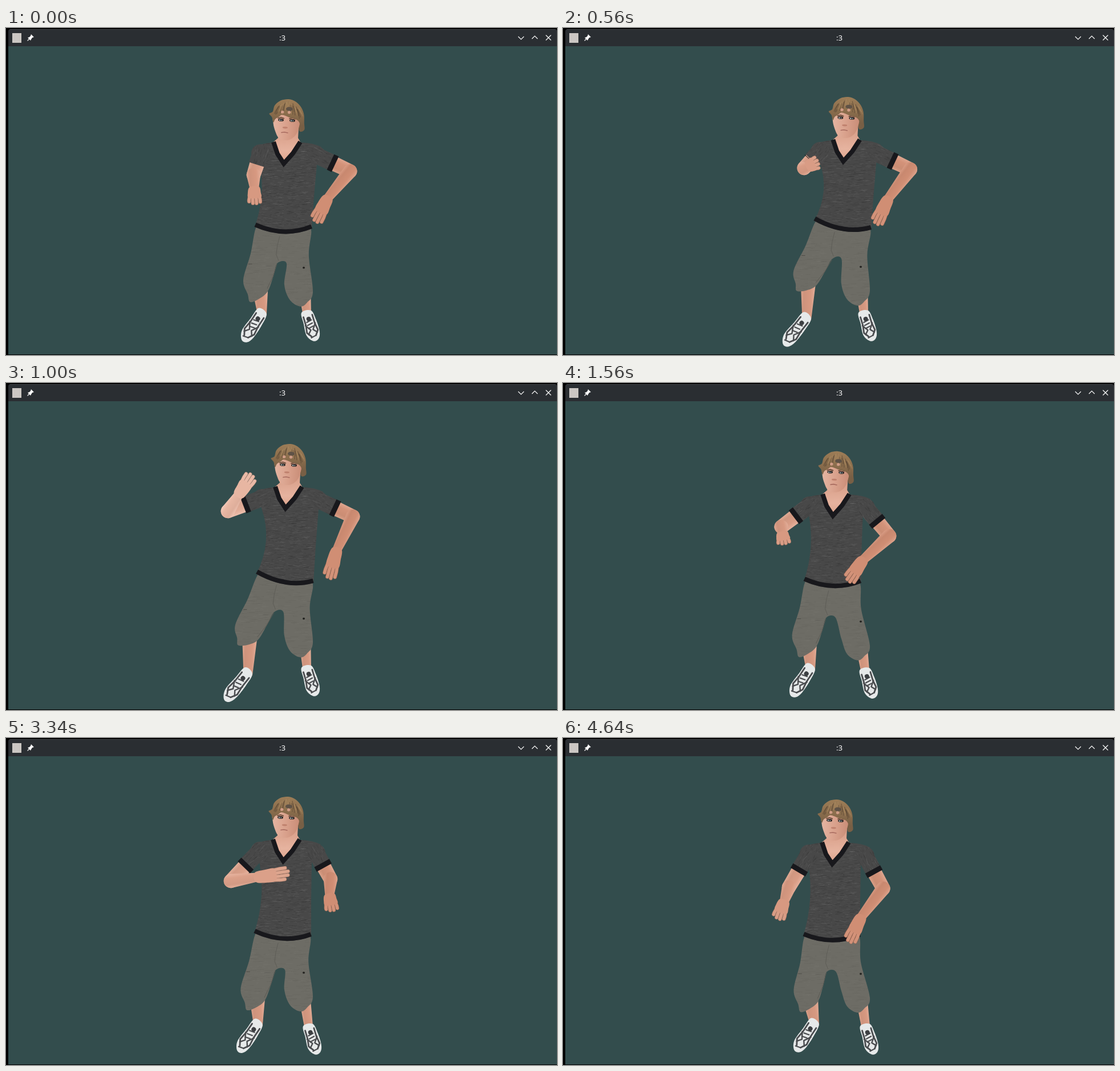
An HTML page with a canvas for the animation above (8000 ms loop, 966x574 px).

```html
<!DOCTYPE html>
<html lang="en">
<head>
<meta charset="utf-8">
<title>:3</title>
<style>
  html, body { margin: 0; width: 100%; height: 100%; overflow: hidden; background: #000; }
  canvas { display: block; }
</style>
</head>
<body>
<canvas id="stage" width="966" height="574"></canvas>
<script>
const ctx = document.getElementById('stage').getContext('2d');
const LOOP = 8000;
const BAND = '#18181c';

// Key poses: neckline tip, left toe x, left elbow from its shoulder,
// and both fingertips from their elbows. Every other joint follows by rule.
const poses = [
  { vee: [487, 247], toe: [418], elbow: [-12, 38], left: [3, 53], right: [-61, 91] },
  { vee: [490, 250], toe: [402], elbow: [-10, 29], left: [-18, 32], right: [-64, 90] },
  { vee: [493, 235], toe: [377], elbow: [-48, 31], left: [53, -52], right: [-56, 108] },
  { vee: [490, 229], toe: [387], elbow: [-60, 23], left: [43, -66], right: [-42, 111] },
  { vee: [466, 236], toe: [410], elbow: [-45, 44], left: [-12, 63], right: [-86, 69] },
  { vee: [486, 225], toe: [410], elbow: [-51, 53], left: [104, -15], right: [4, 58] },
  { vee: [472, 230], toe: [410], elbow: [-35, 59], left: [-19, 58], right: [-60, 96] }
];

// Time, pose phase, vertical shift of the upper body.
const knots = [
  [0, 0, 0], [160, .9, 0], [400, 1, 0], [720, 2, 0], [1000, 3, 0], [1240, 3.15, 0],
  [1560, 3.7, 8], [1700, 3.87, 6], [1960, 4, 0], [3340, 5, 0], [3920, 5.4, -8], [4640, 6, 0]
];
// The picture is redrawn only at these moments.
const steps = (from, to, n) => Array.from({ length: n + 1 }, (_, i) => from + (to - from) * i / n);
const ticks = [0, 20, 90, 160, 400, ...steps(420, 720, 7), ...steps(820, 1000, 5),
  ...steps(1100, 1140, 2), 1240, 1560, 1700, 1960, 3340, 3920, 4640];

const mix = (a, b, k) => a + (b - a) * k;
const clamp = (v, lo, hi) => Math.max(lo, Math.min(hi, v));
const off = (p, x, y) => [p[0] + x, p[1] + y];
const between = (a, b, k) => [mix(a[0], b[0], k), mix(a[1], b[1], k)];
const dist = (a, b) => Math.hypot(b[0] - a[0], b[1] - a[1]);

function stateAt(t) {
  const now = ticks.filter(s => s <= t).pop();
  let i = 0;
  while (i < knots.length - 2 && knots[i + 1][0] <= now) i++;
  const a = knots[i], b = knots[i + 1];
  const k = clamp((now - a[0]) / (b[0] - a[0]), 0, 1);
  return { phase: mix(a[1], b[1], k), lift: mix(a[2], b[2], k) };
}

function poseAt({ phase, lift }) {
  const i = Math.min(poses.length - 2, Math.floor(phase));
  const key = name => poses[i][name].map((v, n) => mix(v, poses[i + 1][name][n], phase - i));
  const vee = off(key('vee'), 0, lift), [toeX] = key('toe');
  const turn = clamp(phase - 3, 0, 1);

  // Trunk and legs lean with the stride of the left foot.
  const stride = vee[0] - 1 - toeX, raise = Math.max(0, stride - 70);
  const hip = [vee[0] - 1, 300 + vee[1] * .2 - (stride - 80) * .12];
  const slope = (60 - stride) * .19;
  const hemL = off(hip, -50, slope), hemR = off(hip, 50, -slope);
  const toeL = [toeX, 546 + raise * .25], toeR = [541 + 3 * turn, 545 + 6 * turn];
  const kneeL = [(hemL[0] + toeX) / 2 - 11, 442 - raise * .55];

  // Arms hang from the shoulders.
  const shoulderL = off(vee, -41, -27), shoulderR = off(vee, 58, -23);
  const elbowL = off(shoulderL, ...key('elbow'));
  const tipL = off(elbowL, ...key('left'));
  const right = key('right'), angle = mix(.44, 1.07, turn);
  const upper = 38 + .24 * Math.hypot(...right);
  const elbowR = off(shoulderR, Math.cos(angle) * upper, Math.sin(angle) * upper);
  const tipR = off(elbowR, ...right);

  return {
    vee, turn, raise, hemL, hemR, toeL, toeR, kneeL,
    head: off(vee, 7, -122),
    crotch: off(hip, -.25 * (stride - 55), 61 - raise * .1),
    cuffA: off(kneeL, 12 - raise * .22, 39 - raise * .1),
    cuffB: off(kneeL, 43 - raise * .1, 20 + raise * .2),
    shinR: [516, 484 + (vee[1] - 235) * .4],
    ankleL: off(toeL, 31 + raise * .2, -47),
    armL: { shoulder: shoulderL, elbow: elbowL, wrist: between(elbowL, tipL, .43), tip: tipL, light: .25 },
    armR: { shoulder: shoulderR, elbow: elbowR, wrist: off(between(elbowR, tipR, .57), -4, -5), tip: tipR, light: 0 }
  };
}

function random(seed) {
  return () => (seed = (seed * 16807) % 2147483647) / 2147483647;
}

function cloth(base, dark, light, count, reach, seed) {
  const tile = document.createElement('canvas');
  tile.width = tile.height = 160;
  const g = tile.getContext('2d'), rnd = random(seed);
  g.fillStyle = base;
  g.fillRect(0, 0, 160, 160);
  for (let i = 0; i < count; i++) {
    g.fillStyle = rnd() < .5 ? dark : light;
    g.fillRect(rnd() * 160, Math.floor(rnd() * 160), 2 + rnd() * reach, 1);
  }
  return ctx.createPattern(tile, 'repeat');
}
const knit = cloth('#484848', 'rgba(0,0,0,.1)', 'rgba(255,255,255,.045)', 1500, 8, 7);
const twill = cloth('#6d6c65', 'rgba(0,0,0,.035)', 'rgba(255,255,255,.02)', 600, 14, 21);

// Closed smooth curve through the given points.
function blob(pts, fill) {
  const n = pts.length, at = i => pts[(i + n) % n];
  ctx.beginPath();
  ctx.moveTo(...pts[0]);
  for (let i = 0; i < n; i++) {
    const a = at(i - 1), b = at(i), c = at(i + 1), d = at(i + 2);
    ctx.bezierCurveTo(b[0] + (c[0] - a[0]) / 6, b[1] + (c[1] - a[1]) / 6,
      c[0] - (d[0] - b[0]) / 6, c[1] - (d[1] - b[1]) / 6, ...c);
  }
  ctx.fillStyle = fill;
  ctx.fill();
}

function poly(pts, fill) {
  ctx.beginPath();
  pts.forEach(p => ctx.lineTo(...p));
  ctx.fillStyle = fill;
  ctx.fill();
}

function line(pts, color, width, join = 'round') {
  ctx.beginPath();
  pts.forEach(p => ctx.lineTo(...p));
  ctx.strokeStyle = color;
  ctx.lineWidth = width;
  ctx.lineJoin = join;
  ctx.lineCap = join === 'round' ? 'round' : 'butt';
  ctx.stroke();
}

function oval(x, y, rx, ry, fill) {
  ctx.beginPath();
  ctx.ellipse(x, y, rx, ry, 0, 0, 7);
  ctx.fillStyle = fill;
  ctx.fill();
}

// Run a drawing with the x axis pointing from a to b.
function along(a, b, paint) {
  ctx.save();
  ctx.translate(...a);
  ctx.rotate(Math.atan2(b[1] - a[1], b[0] - a[0]));
  paint(dist(a, b));
  ctx.restore();
}

const tone = (k, shade = 1) =>
  `rgb(${[mix(208, 234, k), mix(142, 186, k), mix(116, 167, k)].map(v => Math.round(v * shade))})`;

function limb(a, b, ra, rb, k) {
  along(a, b, len => {
    const g = ctx.createLinearGradient(0, -ra, 0, ra);
    g.addColorStop(0, tone(k + .45));
    g.addColorStop(.3, tone(k));
    g.addColorStop(.75, tone(k, .96));
    g.addColorStop(1, tone(k + .3));
    ctx.beginPath();
    ctx.arc(0, 0, ra, Math.PI / 2, Math.PI * 1.5);
    ctx.arc(len, 0, rb, -Math.PI / 2, Math.PI / 2);
    ctx.fillStyle = g;
    ctx.fill();
  });
}

function hand(wrist, tip, k) {
  along(wrist, tip, d => {
    const len = Math.max(d, 22);
    for (let i = 0; i < 4; i++) {
      const y = -9 + i * 6.5, reach = len * (1 - .045 * (i - 1.3) ** 2) - 3;
      const pts = [[len * .4, y * .8], [len * .7, y], [reach, y]];
      line(pts, tone(k, .78), 6.6);
      line(pts, tone(k + .1), 5.2);
    }
    blob([[-2, -8], [len * .3, -11], [len * .55, -11], [len * .6, 0], [len * .55, 11],
      [len * .3, 12], [-2, 8]], tone(k));
  });
}

function sleeve(from, to, band) {
  along(from, to, len => {
    oval(0, 0, 16, 16, knit);
    ctx.fillRect(0, -14.5, len, 29);
    ctx.fillStyle = BAND;
    ctx.fillRect(len + 2 - band, -15, band, 30);
  });
}

function shoe(ankle, toe) {
  along(ankle, toe, len => {
    const x = k => len * k, dark = '#4a4c4f';
    blob([[-2, -8], [x(.35), -12], [x(.8), -12], [len + 2, -7], [len + 4, 3], [x(.82), 12],
      [x(.35), 11], [-3, 9]], '#e6e9e9');
    for (const side of [-1, 1]) {
      line([[x(.12), side * 8], [x(.45), side * 8], [x(.72), side * 10], [x(.9), side * 4]], dark, 2.8);
      line([[x(.45), side * 9], [x(.66), side * 2], [x(.8), side * 8]], dark, 2.4);
    }
    for (const k of [.3, .42, .54, .9]) line([[x(k), -4], [x(k + .04), 5]], dark, 2.2);
    oval(x(.24), 0, 4, 4, '#3c3f42');
  });
}

function drawLegs(p) {
  const c = p.crotch, s = p.shinR, outer = off(s, 22, -26);
  const ankleR = off(p.toeR, -13.5, -45);
  limb(off(between(p.cuffA, p.cuffB, .58), 0, -6), off(p.ankleL, 0, 3), 13, 8, .25);
  limb(off(s, 9, -14), ankleR, 9.5, 7.5, .25);
  shoe(p.ankleL, p.toeL);
  shoe(ankleR, p.toeR);

  twill.setTransform(new DOMMatrix().translate(...c));
  blob([
    off(p.hemL, 16, -6), off(p.hemL, 2, 2), off(between(p.hemL, p.kneeL, .5), 3, 0), p.kneeL,
    between(p.kneeL, p.cuffA, .65), p.cuffA, off(between(p.cuffA, p.cuffB, .5), 0, 4), p.cuffB,
    off(between(p.cuffB, c, .55), -3, 0), off(c, -7, 1), off(c, 9, 1),
    off(s, -28, -38), off(s, -18, -11), s, off(s, 12, -7), outer,
    off(between(p.hemR, outer, .42), -6, 0), off(p.hemR, -1, 2), off(p.hemR, -16, -6)
  ], twill);

  // Seams, fly and pocket marks
  line([off(c, -3, -46), off(c, -7, -30), off(c, -9, -14), off(c, -5, -4)], '#5e5d57', 1);
  line([off(p.cuffB, -1, -5), off(between(p.cuffB, c, .5), -3, 0), off(c, -8, 3)], '#5b5a54', 1);
  oval(s[0] + 6, s[1] - 68, 2, 1.8, '#22221f');
  const pocket = between(p.hemL, p.kneeL, .7);
  line([off(pocket, 3, 0), off(pocket, 9, 0)], '#4d4c47', 1);
}

function drawTorso(p) {
  const v = p.vee, mid = between(p.hemL, p.hemR, .5);
  const pitL = off(v, -42, -9), pitR = off(v, 58 - 8 * p.turn, -8);
  knit.setTransform(new DOMMatrix().translate(...v));
  ctx.beginPath();
  ctx.moveTo(...off(v, -20, -46));
  ctx.quadraticCurveTo(...off(v, -36, -45), ...off(v, -46, -40));
  ctx.lineTo(...pitL);
  ctx.quadraticCurveTo(...off(between(pitL, p.hemL, .5), 15 + p.raise * .3, 0), ...p.hemL);
  ctx.quadraticCurveTo(...off(mid, 2, 21), ...p.hemR);
  ctx.quadraticCurveTo(...off(between(pitR, p.hemR, .5), -1, 0), ...pitR);
  ctx.lineTo(...off(v, 66, -38));
  ctx.quadraticCurveTo(...off(v, 52, -45), ...off(v, 33, -46));
  ctx.fillStyle = knit;
  ctx.fill();

  ctx.beginPath();
  ctx.moveTo(...off(p.hemL, 1, -4));
  ctx.quadraticCurveTo(...off(mid, 2, 17), ...off(p.hemR, -.5, -4));
  ctx.strokeStyle = BAND;
  ctx.lineWidth = 8;
  ctx.lineCap = 'butt';
  ctx.stroke();
}

function drawNeck(p) {
  const v = p.vee, h = p.head;
  const g = ctx.createLinearGradient(0, h[1] + 60, 0, v[1]);
  g.addColorStop(0, '#d9a08a');
  g.addColorStop(.5, '#e6b39f');
  g.addColorStop(1, '#d99c82');
  const left = off(v, -18, -47), tip = off(v, 0, -9), right = off(v, 29, -47);
  poly([off(h, -18, 52), off(h, -17, 68), left, tip, right, off(h, 18, 68), off(h, 19, 52)], g);
  line([left, off(v, -11, -26), tip, off(v, 16, -27), right], BAND, 8, 'miter');
}

function drawHead(p) {
  ctx.save();
  ctx.translate(...off(p.head, 0, 36));
  ctx.rotate(.05);
  ctx.translate(0, -36);
  const face = ctx.createLinearGradient(-25, 0, 22, 0);
  face.addColorStop(0, '#e4b4a1');
  face.addColorStop(.5, '#d9a18c');
  face.addColorStop(1, '#c98d77');
  blob([[-25, 30], [-25, 44], [-21, 57], [-15, 68], [-6, 72], [4, 71], [13, 65], [19, 54],
    [22, 40], [20, 26], [-8, 20]], face);

  for (const x of [-12, 8]) {
    line([[x - 5, 34], [x, 32.5], [x + 5, 34]], '#6b4d3c', 2);
    oval(x, 37, 5, 2.4, '#2b2422');
    oval(x - .5, 37.4, 3, 1.2, '#c4cac9');
    oval(x, 37.2, 1.4, 1.4, '#354044');
  }
  oval(-4, 50, 4.5, 1.6, 'rgba(165,95,78,.5)');
  line([[-10, 59], [-5, 58], [1, 59]], '#a86c60', 1.6);

  const hair = ctx.createLinearGradient(0, 0, 0, 45);
  hair.addColorStop(0, '#9d7d57');
  hair.addColorStop(.5, '#8d6f4d');
  hair.addColorStop(1, '#785f45');
  blob([[-33, 27], [-27, 23], [-24, 12], [-14, 3], [0, 0], [13, 4], [23, 14], [28, 26], [29, 40],
    [30, 52], [23, 56], [20, 51], [21, 41], [15, 35], [3, 32], [-10, 28], [-16, 32], [-22, 36],
    [-25, 42], [-28, 33]], hair);
  const rnd = random(11);
  for (let i = 0; i < 26; i++) {
    const x = -22 + i * 1.85, top = 4 + x * x * .02 + rnd() * 6;
    line([[x * .8, top], [x, top + 8], [x * 1.08, top + 10 + rnd() * 6]],
      rnd() < .5 ? 'rgba(62,50,40,.4)' : 'rgba(180,148,106,.4)', 1.3);
  }
  oval(2, 17, 6, 3.5, '#5f5246');
  for (const x of [-10, 2]) oval(x, 23, 2.8, 2.6, '#cf9c86');
  ctx.restore();
}

function drawArm({ shoulder, elbow, wrist, tip, light }) {
  const cuff = between(shoulder, elbow, .52);
  const raised = clamp((elbow[1] - wrist[1]) / 25, 0, 1);
  const k = mix(light, .9, raised);
  const fore = () => {
    limb(elbow, wrist, 12.3, 8, k);
    hand(wrist, tip, k);
  };
  limb(cuff, elbow, 13, 12.3, mix(light, .6, raised) + .1);
  if (!raised) fore();
  sleeve(shoulder, cuff, clamp(dist(shoulder, elbow) - 40, 0, 9));
  if (raised) fore();
}

function drawWindow() {
  ctx.fillStyle = '#000';
  ctx.fillRect(0, 0, 966, 574);
  ctx.fillStyle = '#334d4d';
  ctx.fillRect(4, 31, 962, 542);
  ctx.fillStyle = '#2a2e32';
  ctx.beginPath();
  ctx.roundRect(4, 2, 962, 30, [4, 4, 0, 0]);
  ctx.fill();
  line([[7, 2.5], [963, 2.5]], '#44484c', 1);
  ctx.fillStyle = '#cbc7c3';
  ctx.fillRect(11, 9, 16, 17);

  const ink = '#fcfcfc';
  poly([[44, 11], [49, 16], [46, 17], [44, 20], [43, 22], [38, 17], [41, 16], [43, 14]], ink);
  line([[41, 19], [38, 22]], ink, 1.2);
  line([[898, 15], [903, 20], [908, 15]], ink, 1.2, 'miter');
  line([[922, 19], [927, 14], [932, 19]], ink, 1.2, 'miter');
  line([[946.5, 12.5], [955.5, 21.5]], ink, 1.3, 'miter');
  line([[955.5, 12.5], [946.5, 21.5]], ink, 1.3, 'miter');

  ctx.fillStyle = ink;
  ctx.font = '13.3px "Noto Sans", sans-serif';
  ctx.textAlign = 'center';
  ctx.fillText(':3', 484.5, 22);
}

function draw(t) {
  const p = poseAt(stateAt(t));
  drawWindow();
  drawLegs(p);
  drawTorso(p);
  drawNeck(p);
  drawHead(p);
  drawArm(p.armR);
  drawArm(p.armL);
}

const start = performance.now();
function frame(now) {
  draw(Math.max(0, now - start) % LOOP);
  requestAnimationFrame(frame);
}
draw(0);
requestAnimationFrame(frame);
</script>
</body>
</html>
```
